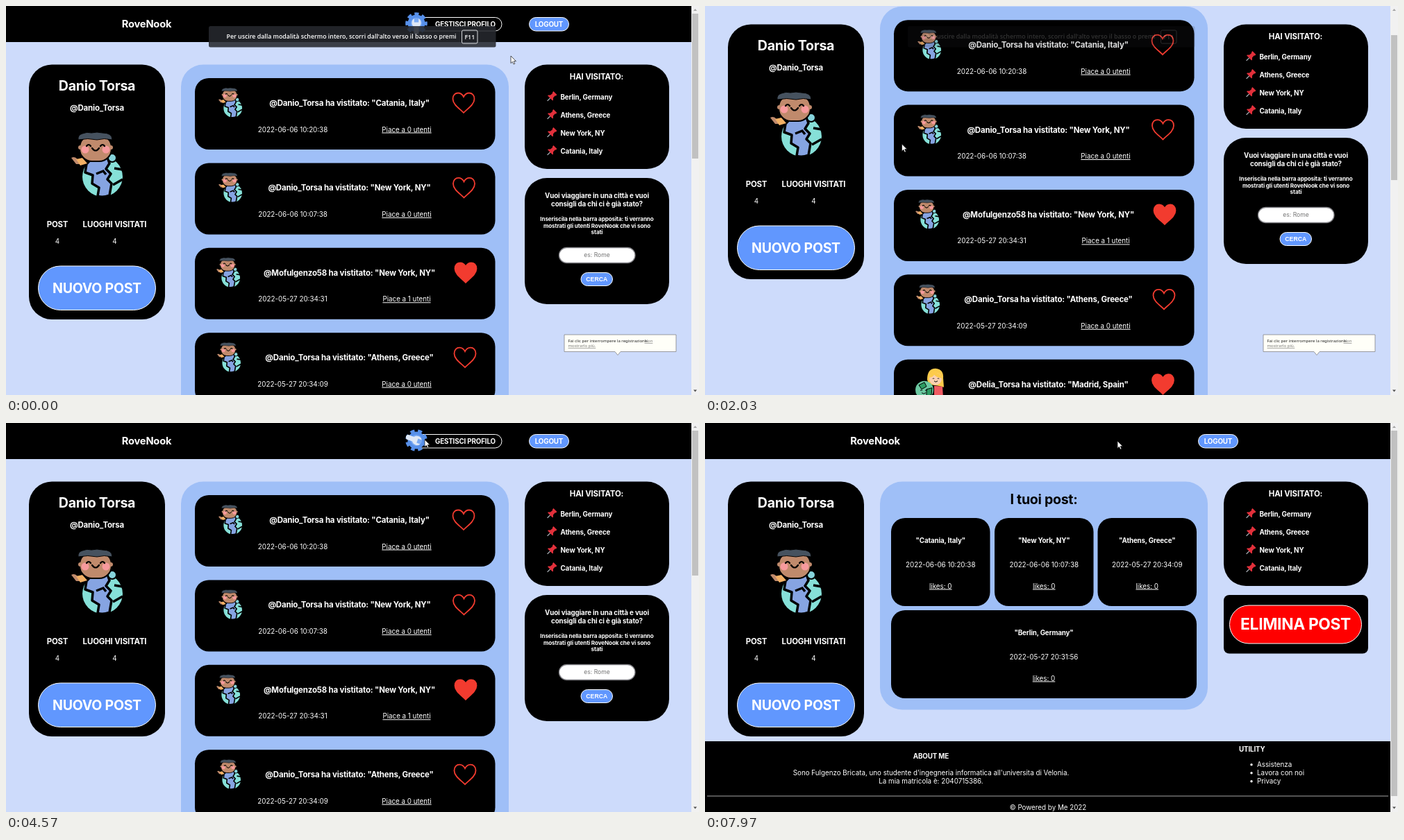
These frames come from a looping animation (998x561 px, 8 s). An HTML page:

```html
<!DOCTYPE html>
<html lang="it">
<head>
<meta charset="utf-8">
<style>
  html, body { margin: 0; width: 100%; height: 100%; overflow: hidden; background: #cddbfb; }
  svg { display: block; width: 998px; height: 561px; }
  text { font-family: Inter, sans-serif; fill: #fff; white-space: pre; }
  .b { font-weight: 700; letter-spacing: -.015em; }
  .u { text-decoration: underline; }
  .m { text-anchor: middle; }
  .os { font-family: "Open Sans", sans-serif; }
  .sb { font-weight: 600; }
  .ns { font-family: "Noto Sans", sans-serif; }
  .ar { font-family: "Liberation Sans", sans-serif; font-weight: 700; }
</style>
</head>
<body>
<svg id="stage" viewBox="0 0 998 561"></svg>
<script>
const LOOP = 8000, STEP = 1000 / 30;
const BLUE = '#6197fe', RED = '#f23b2f';
const BODY = 9.8, H3 = 11.47, H2 = 14.7, H1 = 19.6;
const SITE = 'RoveNook', PERSON = 'Danio Torsa', HANDLE = '@Danio_Torsa';

const rect = (x, y, w, h, r = 0, fill = '#000', extra = '') =>
  `<rect x="${x}" y="${y}" width="${w}" height="${h}" rx="${r}" fill="${fill}" ${extra}/>`;
const text = (x, y, str, size = BODY, cls = 'm', extra = '') =>
  `<text x="${x}" y="${y}" font-size="${size}" class="${cls}" ${extra}>${str}</text>`;
const group = (id, content) => `<g id="${id}">${content}</g>`;
const at = (x, y, content, scale = 1) =>
  `<g transform="translate(${x} ${y}) scale(${scale})">${content}</g>`;
const pill = (x, y, w, h, fill = BLUE) => rect(x, y, w, h, h / 2, fill, 'stroke="#fff"');

// Boy hugging a globe, 75 x 94
const boy = `
  <circle cx="45" cy="64" r="29" fill="#86e0d8"/>
  <path d="M22 46Q32 32 52 36L55 45 50 53 57 60 52 68 58 74 55 91Q45 95 38 92L40 80 30 74 31 62 20 58Z"
    fill="#86a4e2" stroke="#000" stroke-width="3.5" stroke-linejoin="round"/>
  <path d="M36 60L46 56 50 61M60 76L74 68M62 52L74 54" fill="none" stroke="#000" stroke-width="3.5"/>
  <circle cx="59" cy="37" r="6" fill="#86d4dc" stroke="#000" stroke-width="2"/>
  <path d="M0 37Q5 34 9 39L13 46 7 46Z" fill="#c08a6c"/>
  <path d="M7 39L16 37 23 45 13 48Z" fill="#f2b065"/>
  <rect x="12" y="4" width="46" height="38" rx="18" fill="#c08a6c" stroke="#000" stroke-width="2"/>
  <circle cx="13" cy="22" r="3" fill="#c08a6c"/><circle cx="57" cy="22" r="3" fill="#c08a6c"/>
  <path d="M10 11Q9 4 16 2Q23-1 29 1Q37-1 45 1Q59 1 59 11Q47 8 37 11Q24 8 10 11Z" fill="#46525f" stroke="#000"/>
  <circle cx="20" cy="25" r="5.5" fill="#f79a9d"/><circle cx="50" cy="25" r="5.5" fill="#f79a9d"/>
  <path d="M22 20q3-4 6 0M42 20q3-4 6 0M30 23q5 7 10 0" fill="none" stroke="#000" stroke-width="2.2" stroke-linecap="round"/>`;

// Blonde girl with a green globe, 42 x 44
const girl = `
  <path d="M18 16Q18 0 30 0Q42 1 41 14L42 27 34 25 20 23Z" fill="#fdcb4b"/>
  <circle cx="30" cy="15" r="9" fill="#fbd0b0"/>
  <path d="M21 13Q24 4 31 6Q38 8 39 14Q31 13 28 9Q26 13 21 13Z" fill="#fdcb4b"/>
  <path d="M26 15q1-2 2 0M33 15q1-2 2 0M28 18q2 3 5 0" fill="none" stroke="#000"/>
  <path d="M28 25L40 26 41 42 28 44Z" fill="#ef5a62"/>
  <circle cx="14" cy="31" r="13" fill="#6cc9a1"/>
  <path d="M6 24L14 20 17 26 10 30ZM17 30L25 28 24 38 17 40Z" fill="#2c9c62" stroke="#000"/>
  <path d="M8 32q1-2 3 0M15 32q1-2 3 0M10 35q3 3 6 0" fill="none" stroke="#000"/>`;

const heart = fill => `<path d="M0 14.5C-5 9-15.5 3-15.5-5.5C-15.5-11-12-14-8-14
  C-4-14-1.5-11.5 0-8.5C1.5-11.5 4-14 8-14C12-14 15.5-11 15.5-5.5C15.5 3 5 9 0 14.5Z"
  fill="${fill}" stroke="${RED}" stroke-width="1.8"/>`;

const pin = `<g transform="rotate(45)">
  <path d="M0 2V9" stroke="#b8bec6" stroke-width="1.2"/>
  <path d="M-3.5-7H3.5V-5L2.5-4 2.8 0 5 2.2V3.4H-5V2.2L-2.8 0-2.5-4-3.5-5Z" fill="#e2303b"/></g>`;

const gear = `
  <circle r="13.3" fill="none" stroke="#5790ea" stroke-width="5" stroke-dasharray="6 4.446" stroke-dashoffset="3"/>
  <circle r="12.5" fill="#5790ea"/><circle r="8" fill="#79a9f3"/>
  <path d="M-3.2-7V-1.5H3.2V-7Q6.5-5 6.5-1Q6.5 3 3.5 5V14Q0 18-3.5 14V5Q-6.5 3-6.5-1Q-6.5-5-3.2-7Z" fill="#dfe8f6"/>`;

const posts = [
  [HANDLE, 'Catania, Italy', '2022-06-06 10:20:38', 0, 306, 659],
  [HANDLE, 'New York, NY', '2022-06-06 10:07:38', 0, 306, 659.5],
  ['@Mofulgenzo58', 'New York, NY', '2022-05-27 20:34:31', 1, 303, 662],
  [HANDLE, 'Athens, Greece', '2022-05-27 20:34:09', 0, 304, 661],
  ['@Delia_Torsa', 'Madrid, Spain', '2022-05-27 20:33:12', 1, 302, 659.5],
];
const postCard = ([user, place, date, likes, avatarX, heartX], i) => {
  const y = 104 + i * 122.4;
  return rect(272, y, 432.5, 103, 20)
    + (i < 4 ? at(avatarX, y + 14, boy, .46) : at(avatarX, y + 13, girl))
    + text(494.5, y + 40, `${user} ha vistitato: "${place}"`, H3, 'm b')
    + text(413, y + 77.5, date)
    + text(577, y + 77.5, `Piace a ${likes} utenti`, BODY, 'm u')
    + at(heartX, y + 35.5, heart(likes ? RED : 'none'));
};
const ownCard = (x, y, w, place, date) => {
  const mid = x + w / 2;
  return rect(x, y, w, 127, 20)
    + text(mid, y + 35.5, `"${place}"`, BODY, 'm b')
    + text(mid, y + 70.5, date)
    + text(mid, y + 101.5, 'likes: 0', BODY, 'm u');
};
const logout = x => pill(x, 16.5, 57, 19.5) + text(x + 28.5, 29.8, 'LOGOUT', BODY, 'm b');

const profile = rect(33, 84.5, 196, 367.5, 33)
  + text(131, 122.3, PERSON, H1, 'm b') + text(131, 151, HANDLE, H3, 'm b')
  + at(94, 182, boy)
  + text(74, 319, 'POST', H3, 'm b') + text(156.5, 319, 'LUOGHI VISITATI', H3, 'm b')
  + text(74, 342.5, '4') + text(156.5, 342.5, '4')
  + pill(46.5, 375, 169, 63.5) + text(131, 413.5, 'NUOVO POST', H1, 'm b');

const visited = rect(747, 84.5, 208, 150.5, 32)
  + text(850.5, 106, 'HAI VISITATO:', H3, 'm b')
  + ['Berlin, Germany', 'Athens, Greece', 'New York, NY', 'Catania, Italy'].map((place, i) =>
      at(786, 130.5 + i * 26, pin) + text(798.5, 134.7 + i * 26, place, BODY, 'b')).join('');

const search = rect(747, 248, 208, 182, 32)
  + text(851, 277.3, 'Vuoi viaggiare in una città e vuoi', BODY, 'm b')
  + text(851, 289.3, 'consigli da chi ci è già stato?', BODY, 'm b')
  + text(851, 309.8, 'Inseriscila nella barra apposita: ti verranno', 8.13, 'm b')
  + text(851, 319.6, `mostrati gli utenti ${SITE} che vi sono`, 8.13, 'm b')
  + text(851, 329.4, 'stati', 8.13, 'm b')
  + rect(796.5, 348.5, 109.5, 22, 11, '#fff', 'stroke="#85858a" stroke-width="1.3"')
  + text(851, 362.4, 'es: Rome', 8.6, 'm', 'style="fill:#757575"')
  + pill(828, 384.5, 45.5, 19) + text(850.8, 397, 'CERCA', 8.7, 'm ar');

const homeHeader = rect(0, 0, 987, 52)
  + text(202.5, 31.2, SITE, H2, 'm b')
  + pill(580, 16.5, 134, 19.5, '#000') + text(661.5, 29.8, 'GESTISCI PROFILO', BODY, 'm b')
  + at(591, 25, group('gear', gear)) + logout(753.5);

const ownPage = rect(0, 0, 987, 52) + text(245, 31.2, SITE, H2, 'm b') + logout(710.5)
  + rect(252, 84.5, 472, 329, 32, '#9fbff7')
  + text(488, 116.5, 'I tuoi post:', H1, 'm b', 'style="fill:#000"')
  + group('ownPosts',
      ownCard(268, 137, 142.5, 'Catania, Italy', '2022-06-06 10:20:38')
    + ownCard(417, 137, 142.5, 'New York, NY', '2022-06-06 10:07:38')
    + ownCard(565.5, 137, 142.5, 'Athens, Greece', '2022-05-27 20:34:09')
    + ownCard(268, 270, 440, 'Berlin, Germany', '2022-05-27 20:31:56'))
  + rect(747, 248, 208, 84.5, 8) + pill(755.5, 263, 190, 55, '#f00')
  + text(850.5, 298.3, 'ELIMINA POST', 22.8, 'm b')
  + rect(0, 459, 987, 102)
  + text(325.5, 484, 'ABOUT ME', BODY, 'm b')
  + text(325.5, 508, "Sono Fulgenzo Bricata, uno studente d'ingegneria informatica all'universita di Velonia.")
  + text(325.5, 520, 'La mia matricola è: 2040715386.')
  + text(769, 474, 'UTILITY', BODY, 'b')
  + ['Assistenza', 'Lavora con noi', 'Privacy'].map((item, i) =>
      `<circle cx="787" cy="${492.8 + i * 12}" r="1.7" fill="#fff"/>`
      + text(795, 496 + i * 12, item, BODY, '')).join('')
  + rect(3, 537.5, 981, 1, 0, '#a5a5a5') + text(494, 558, '© Powered by Me 2022');

const scrollbar = rect(987, 0, 11, 561, 0, '#f1f1f1')
  + rect(988, 11, 9, 209, 0, '#c1c1c1', 'id="thumb"')
  + '<path d="M990 7L992.5 4 995 7Z" fill="#a3a3a3"/><path d="M990 553.5L992.5 556.5 995 553.5Z" fill="#505050"/>';

const banner = rect(292, 29, 413.5, 30.5, 2.5, 'rgba(38,41,47,.87)')
  + text(317.5, 47.3, "Per uscire dalla modalità schermo intero, scorri dall'alto verso il basso o premi", 8.8, 'os sb')
  + rect(656.5, 35, 22.5, 19, 2, 'none', 'stroke="#d5d7da"') + text(667.8, 47.6, 'F11', 8.8, 'm os sb');

const tip = `<path d="M804 474H965V498.5H885L881 503.5 877 498.5H804Z" fill="#fffff8" stroke="#85858a" stroke-width=".8"/>`
  + text(809.5, 485, 'Fai clic per interrompere la registrazione.', 6, 'ns', 'style="fill:#222"')
  + text(919.5, 485, 'Non', 6, 'ns u', 'style="fill:#777"')
  + text(809.5, 492, 'mostrarlo più.', 6, 'ns u', 'style="fill:#777"');

const status = rect(0, 547, 331, 14, 0, '#202225')
  + text(3, 556.7, 'Connessione in corso...', 7, 'os', 'style="fill:#85888d"');

const stage = document.getElementById('stage');
stage.innerHTML = rect(0, 0, 998, 561, 0, '#cddbfb')
  + group('feed', homeHeader + rect(252, 84.5, 472, 900, 32, '#9fbff7') + posts.map(postCard).join(''))
  + group('side', profile + visited + group('search', search))
  + group('own', ownPage)
  + scrollbar + group('banner', banner) + group('tip', tip) + group('status', status)
  + group('cursor', '<path d="M0 0V10.5L2.4 8.3 4.1 12 5.8 11.2 4.2 7.6H7.5Z" fill="#fff" stroke="#111" stroke-width=".7"/>');

const el = id => document.getElementById(id);
const linear = p => p, smooth = p => p * p * (3 - 2 * p);
const clamp = v => Math.min(1, Math.max(0, v));

// Keys are [time, ...values]
function track(keys, t, ease = linear) {
  const i = keys.findIndex(k => k[0] > t);
  if (i === 0) return keys[0].slice(1);
  if (i < 0) return keys.at(-1).slice(1);
  const [a, b] = [keys[i - 1], keys[i]];
  const p = ease((t - a[0]) / (b[0] - a[0]));
  return a.slice(1).map((v, j) => v + (b[j + 1] - v) * p);
}

const scrollKeys = [[1570, 0], [1667, 73], [1750, 115], [1840, 140], [1930, 120],
  [2033, 84], [2150, 38], [2280, 10], [2433, 1], [2500, 0]];
const cursorKeys = [[20, 727, 72], [300, 375, 179], [560, 375, 179], [770, 283.5, 199],
  [2600, 283.5, 199], [3250, 665, 30], [3900, 603, 24], [5030, 603, 24], [5850, 594, 26]];

const move = (id, x, y) => el(id).setAttribute('transform', `translate(${x} ${y})`);
const show = (id, on) => el(id).setAttribute('display', on ? 'inline' : 'none');

function draw(t) {
  const [scroll] = track(scrollKeys, t);
  const newPage = t >= 6690;
  const spinStart = t >= 3260 && t < 4860 ? 3260 : t >= 5000 && t < 5960 ? 5000 : t;

  move('feed', 0, -scroll);
  move('side', 0, -Math.min(scroll, 58));
  move('cursor', ...track(cursorKeys, t, smooth));
  el('gear').setAttribute('transform', `rotate(${(t - spinStart) * .36})`);
  el('thumb').setAttribute('y', 11 + scroll * .37);
  el('thumb').setAttribute('height', newPage ? 527 : 209);

  show('feed', !newPage);
  show('search', !newPage);
  show('own', newPage);
  show('ownPosts', t >= 7260);
  show('tip', t < 4400);
  el('banner').setAttribute('opacity', clamp((2130 - t) / 500));
  el('status').setAttribute('opacity', newPage ? 0 : clamp((t - 6330) / 200));
}

function tick() {
  const t = performance.now() % LOOP;
  draw(Math.floor((t + 5) / STEP) * STEP);
  requestAnimationFrame(tick);
}
tick();
</script>
</body>
</html>
```
